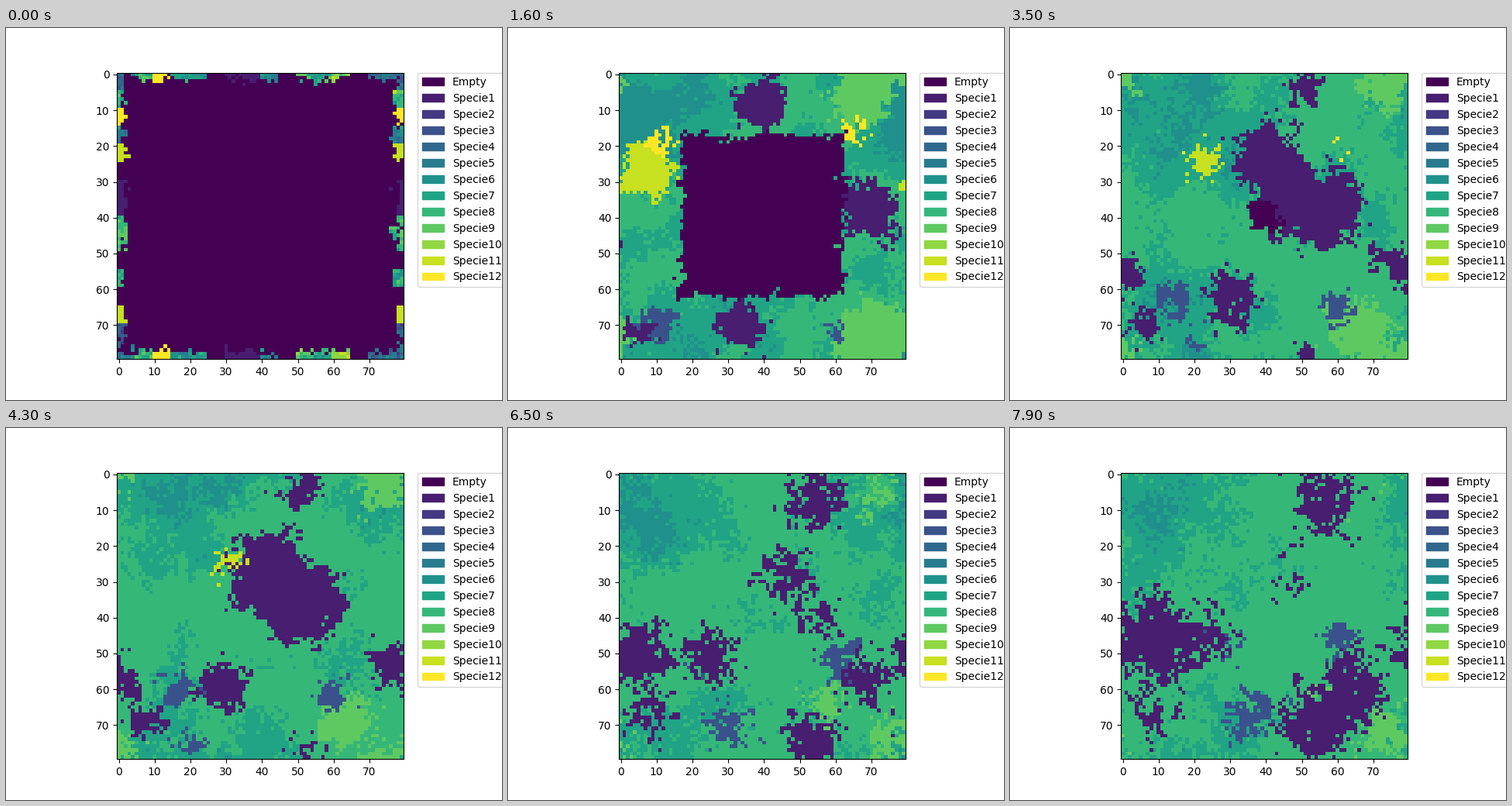
A matplotlib script that plays this animation: 640 by 480 pixels, repeating every 8000 ms.

```python
import numpy as np
import matplotlib.pyplot as plt
from matplotlib.animation import FuncAnimation
from matplotlib.patches import Patch

SIZE, FRAMES, INTERVAL = 80, 80, 100
LABELS = ["Empty"] + [f"Specie{i}" for i in range(1, 13)]

# Species met along the border, one per five cells
ROW_SEEDS = [5, 8, 12, 6, 7, 0, 1, 1, 6, 0, 9, 8, 10, 0, 4, 4]
COL_SEEDS = [4, 8, 12, 5, 11, 0, 1, 1, 8, 8, 0, 7, 0, 11, 4, 4]

# Drifting colonies: species, then x, y, radius at the start and at the end
WHOLE = [(9, 71, 75, 11, 54, 60, 2), (3, 10, 70, 5, 26, 47, 4),
         (3, 59, 72, 3, 62, 47, 5), (1, 34, 70, 7, 22, 45, 6),
         (1, 5, 72, 4, 8, 66, 5)]
LATE = [(9, 74, 3, 7, 66, 11, 1), (9, 80, 78, 4, 72, 72, 6),
        (3, 20, 74, 3, 36, 67, 6), (1, 42, 26, 10, 48, 30, 3),
        (1, 50, 36, 12, 58, 43, 0), (1, 51, 4, 5, 57, 9, 8),
        (1, 2, 58, 4, 8, 46, 11), (1, 52, 78, 3, 54, 70, 10),
        (1, 78, 54, 5, 64, 60, 8)]
EARLY = [(9, 67, 7, 8, 75, 2, 5), (1, 39, 8, 7, 41, 30, 10),
         (1, 69, 38, 8, 50, 37, 12), (1, 76, 46, 3, 74, 53, 5),
         (11, 7, 27, 8, 31, 24, 3), (12, 11, 20, 3, 20, 22, 0),
         (12, 65, 17, 3, 58, 22, 0)]

rng = np.random.default_rng(12)
Y, X = np.mgrid[:SIZE, :SIZE]


def blur(a, axis, passes):
    for _ in range(passes):
        a = (np.roll(a, 1, axis) + 2 * a + np.roll(a, -1, axis)) / 4
    return a


def make_noise(space, time):
    """Noise over step, y and x with unit spread, periodic in all three."""
    a = rng.standard_normal((FRAMES, SIZE, SIZE))
    a = blur(blur(blur(a, 0, time), 1, space), 2, space)
    return a / a.std()


fine, coarse, broad = make_noise(0, 6), make_noise(2, 6), make_noise(24, 16)
rough = (fine + coarse) / np.sqrt(2)


def distance(x, y):
    half = SIZE / 2
    return np.hypot((X - x + half) % SIZE - half, (Y - y + half) % SIZE - half)


def ground(n):
    """Green, turning teal around the upper left and, early on, everywhere."""
    teal = 1.6 * np.exp(-(distance(12, 10) / 22) ** 2) + max(0, 1 - n / 45)
    return np.clip(np.round(8.2 - teal - 0.45 * broad[n] - 0.15 * fine[n]), 6, 8)


def paint(grid, n, colonies, t0, t1, size=1):
    u = np.clip((n - t0) / (t1 - t0), 0, 1)
    for kind, x0, y0, r0, x1, y1, r1 in colonies:
        x, y, r = x0 + u * (x1 - x0), y0 + u * (y1 - y0), r0 + u * (r1 - r0)
        grid[distance(x, y) < r * np.clip(size, 0, 1)] = kind


def scatter(grid, n):
    """Fray the outlines by letting cells copy a nearby one."""
    reach = 1 + 1.8 * n / FRAMES
    dx = np.round(reach * rough[n]).astype(int)
    dy = np.round(reach * np.roll(rough[n], 37, 0)).astype(int)
    return grid[(Y + dy) % SIZE, (X + dx) % SIZE]


edge_x = np.minimum(X, SIZE - 1 - X)
edge_y = np.minimum(Y, SIZE - 1 - Y)
edge = np.minimum(edge_x, edge_y)
seeds = np.where(edge_y < edge_x, np.array(ROW_SEEDS)[X // 5],
                 np.array(COL_SEEDS)[Y // 5])
mixed = (seeds > 1) & (seeds < 11)
seeds = np.where(mixed, np.clip(seeds + np.round(0.8 * rough[40]), 1, 12), seeds)


def make_grid(n):
    grid = ground(n)
    paint(grid, n, WHOLE, 16, 79)
    paint(grid, n, LATE, 44, 79, (n - 28) / 8)
    paint(grid, n, EARLY, 16, 44, (50 - n) / 6)
    grid = scatter(grid, n)
    grid = np.where(n + np.abs(rough[0]) < 4, seeds, grid)
    front = 2 + 0.965 * n + 0.9 * rough[n // 4]
    return np.where(edge + 0.5 < front, grid, 0)


grids = [make_grid(n) for n in range(FRAMES)]

fig, ax = plt.subplots(figsize=(6.4, 4.8), dpi=100)
im = ax.imshow(grids[0], vmin=0, vmax=12, cmap="viridis")
handles = [Patch(color=im.cmap(im.norm(i)), label=name)
           for i, name in enumerate(LABELS)]
ax.legend(handles=handles, bbox_to_anchor=(1.05, 1), loc=2, borderaxespad=0)


def update(n):
    im.set_data(grids[n])
    return [im]


anim = FuncAnimation(fig, update, frames=FRAMES, interval=INTERVAL, repeat=True)
plt.show()
```
